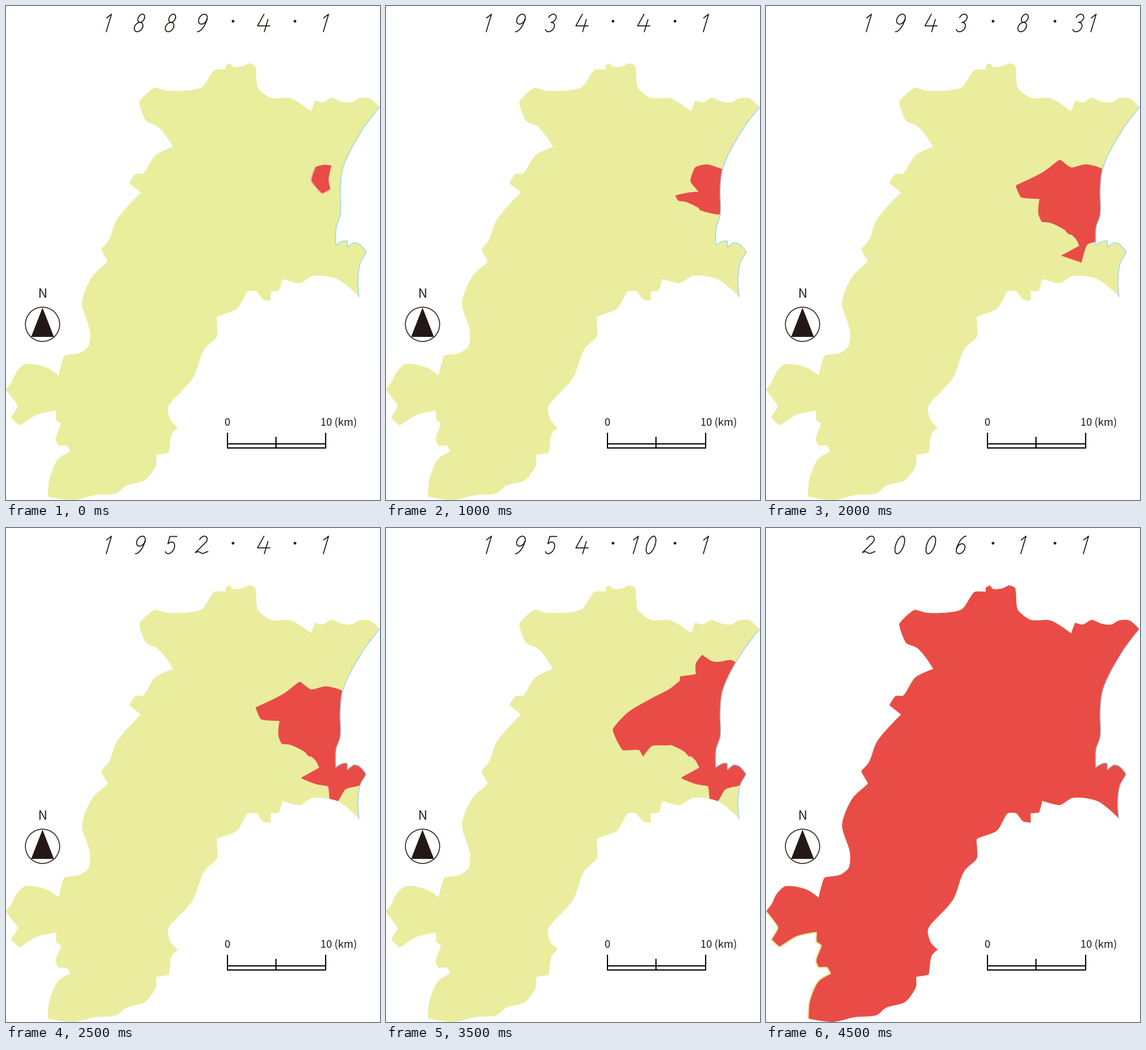
Write a matplotlib script that moves like this. It is 640 px wide and 845 px high and loops after 5000 ms.

```python
import numpy as np
import matplotlib.pyplot as plt
from matplotlib.animation import FuncAnimation
from matplotlib.collections import LineCollection
from matplotlib.patches import Circle, Polygon

W, H, DPI = 640, 845, 80
PX = 72 / DPI
INK = "#231815"
RED = "#e94c47"
SEA = "#a3d9e8"
YELLOWS = ["#e8ee9c", "#eaed9e"]

# Key points of the border, clockwise from the north-west corner
NORTH = [(228, 164), (254, 140), (276, 145), (335, 139), (357, 109),
         (376, 109), (376, 102), (383, 98), (388, 104), (405, 103),
         (416, 98), (426, 102), (431, 140), (453, 157), (487, 158),
         (522, 180), (529, 162), (542, 165), (557, 157), (576, 164),
         (591, 165), (604, 158), (622, 158)]
COAST = [(639, 173), (611, 210), (576.5, 277), (572, 313), (572, 357),
         (565, 379), (564.5, 409), (576, 402.5), (584, 402), (584.5, 413),
         (595, 405), (604, 407), (616, 421), (606, 440), (602, 470),
         (604, 497)]
SOUTH = [(567, 467), (524, 462), (503, 474), (473, 467), (467, 487),
         (453, 488), (453, 504), (440, 502), (428, 488), (414, 488),
         (395, 518), (361, 532), (361, 565), (340, 586), (320, 636),
         (277, 687), (282, 709), (294, 721), (284, 731), (278, 764),
         (257, 768), (257, 784), (238, 811), (205, 821), (190, 833),
         (151, 837), (115, 845)]
SOUTHWEST = [(72, 839), (74, 810), (90, 774), (110, 762), (104, 752),
             (90, 752), (85, 741), (94, 714), (86, 708), (86, 692),
             (53, 699), (23, 717), (9, 704), (20, 684), (0, 656)]
WEST = [(9, 644), (18, 626), (32, 613), (49, 613), (73, 620), (90, 632),
        (100, 598), (127, 593), (141, 582), (144, 559), (130, 508),
        (148, 462), (174, 437), (163, 416), (175, 402), (190, 365),
        (231, 319), (211, 303), (222, 287), (234, 287), (256, 255),
        (286, 241), (272, 220), (258, 205), (240, 197)]
AREA = NORTH + COAST + SOUTH + SOUTHWEST + WEST

# Districts overlap each other and the sea; the land border trims them
TOWN = [(529, 276), (545, 271.5), (557, 273), (552, 297), (555, 314),
        (541, 321), (529, 309), (522, 298)]
PORT = [(529, 277), (548, 271), (576, 279), (590, 283), (590, 357),
        (563, 356), (536, 348), (534, 330), (536, 321), (521, 300)]
SPUR = [(495, 324), (533, 318), (560, 330), (545, 350), (513, 335),
        (500, 333)]
BAY = [(580, 340), (590, 391), (556, 391), (530, 388), (519, 391),
       (512, 384), (531, 363), (532, 348)]
HILLS = [(576, 279), (548, 271), (522, 276), (503, 263), (474, 284),
         (427, 307), (436, 327), (468, 330), (466, 355), (472, 369),
         (487, 371), (529, 397), (536, 410), (505, 427), (540, 439),
         (550, 408), (572, 400), (590, 340)]
DELTA = [(536, 410), (505, 428), (530, 438), (551, 442), (554, 470),
         (567, 468), (581, 447), (606, 440), (640, 420), (600, 395),
         (560, 385)]
TOWER = [(503, 254), (530, 250), (530, 232), (541, 217), (558, 229),
         (549, 243), (549, 269), (576, 279), (560, 300), (500, 300),
         (503, 263)]
BEACH = [(541, 217), (553, 226), (566, 229), (591, 226), (612, 240),
         (600, 290), (540, 300)]
UPLAND = [(503, 261), (487, 274), (455, 291), (412, 317), (388, 345),
          (405, 380), (433, 380), (440, 391), (455, 373), (487, 371),
          (520, 300)]
VALLEY = [(453, 159), (487, 160), (522, 182), (526, 176), (539, 195),
          (531, 207), (541, 218), (553, 228), (530, 280), (500, 275),
          (503, 261), (499, 242), (470, 210), (449, 193), (448, 177)]

STAGES = [("1889.4.1", [TOWN]), ("1909.4.1", [PORT]), ("1934.4.1", [SPUR]),
          ("1936.3.1", [BAY]), ("1943.8.31", [HILLS]), ("1952.4.1", [DELTA]),
          ("1954.1.15", [TOWER]), ("1954.10.1", [BEACH, UPLAND]),
          ("1973.2.1", [VALLEY]), ("2006.1.1", [AREA])]
LAST = len(STAGES) - 1


def smooth(points, closed=True, n=8):
    """Curve through the points that bends at gentle turns, not at corners."""
    p = np.array(points, float)
    q = np.roll(p, -1, 0)
    size = np.hypot(*(q - p).T)[:, None]
    ahead = (q - p) / size
    behind = np.roll(ahead, 1, 0)
    gentle = np.clip((ahead * behind).sum(1, keepdims=True), 0, 1)
    flow = gentle * (ahead + behind) / 2
    m, k = flow * size, np.roll(flow, -1, 0) * size
    t = np.linspace(0, 1, n, endpoint=False)[:, None, None]
    ease = t * t * (3 - 2 * t)
    curve = p + ease * (q - p) + t * (1 - t) * ((1 - t) * m - t * k)
    curve = curve.swapaxes(0, 1).reshape(-1, 2)
    return curve if closed else np.vstack([curve[:-n], p[-1:]])


def arc(cx, cy, rx, ry, start=0, end=360):
    a = np.radians(np.linspace(start, end, 40))
    return np.column_stack([cx + rx * np.cos(a), cy + ry * np.sin(a)])


def path(*parts):
    return np.vstack(parts).astype(float)


# Upright pen strokes of the numerals, 30 high around their middle
s = np.linspace(0, 1, 20)
wave = np.column_stack([-7 + 21 * s, 13 - 1.5 * np.sin(2.5 * np.pi * s)])
six = path(arc(3, 5, 10, 20, 270, 180), arc(0, 6.5, 7, 8.5, 190, -180))
NUMERALS = {
    "0": [arc(0, 0, 7, 15)],
    "1": [path((0, 15), (0, -15), (-6.5, -8.5))],
    "2": [path(arc(0, -8, 6.5, 7, 190, 390), wave)],
    "3": [path(arc(0, -8, 6.5, 7, 190, 450), arc(0.5, 7, 7.5, 8, -90, 150))],
    "4": [path((-3.5, -15), (-8.5, 5), (12.5, 5)), path((6, -6), (6, 15))],
    "5": [path((6, -14.5), (-6, -14.5), (-5.5, -2),
               arc(0, 5, 7.5, 10, 225, 500))],
    "6": [six],
    "7": [path((-10, -9), (-10, -14), (5, -14), (0, 15))],
    "8": [arc(0, -8, 5.5, 7), arc(0, 7, 7, 8)],
    "9": [-six],
}
SLANT = np.array([[1, 0], [-0.3, 1]])


def number(text, center, pitch):
    """Slanted strokes of a number spread evenly about a centre."""
    left = center - pitch * (len(text) - 1) / 2
    return [stroke @ SLANT + (left + i * pitch, 29)
            for i, d in enumerate(text) for stroke in NUMERALS[d]]


fig = plt.figure(figsize=(W / DPI, H / DPI), dpi=DPI, facecolor="white")
ax = fig.add_axes([0, 0, 1, 1])
ax.set_xlim(0, W)
ax.set_ylim(H, 0)
ax.axis("off")


def fill(points, color):
    return ax.add_patch(Polygon(points, fc=color, lw=0))


def line(points, color=INK, width=2.0):
    return ax.plot(*np.transpose(points), color=color, lw=width * PX)[0]


def label(x, y, text, size, align="center"):
    ax.text(x, y, text, fontsize=size * PX, family="Noto Sans CJK JP",
            color=INK, ha=align, va="baseline")


land = fill(smooth(AREA), YELLOWS[0])
districts = []
for stage, (_, shapes) in enumerate(STAGES):
    for shape in shapes:
        patch = fill(smooth(shape), RED)
        patch.set_clip_path(land)
        districts.append((stage, patch))

line(smooth(COAST, closed=False), SEA, 1.6)
rim = line(smooth(TOWN[4:] + TOWN[:1], closed=False), "#f3b7b5", 1.6)
fringe = line(smooth(SOUTHWEST, closed=False), YELLOWS[1], 2.4)

date = ax.add_collection(LineCollection([], colors=INK, linewidths=1.7 * PX,
                                        capstyle="round", joinstyle="round"))
for x in (388.5, 494.5):
    ax.add_patch(Circle((x, 26), 2.3, fc=INK, lw=0))

# Compass
label(62.5, 499, "N", 22)
ax.add_patch(Circle((62.5, 544.5), 29.3, fill=False, ec=INK, lw=1.5 * PX))
fill([(62.5, 516), (82, 566), (43, 566)], INK)

# Scale bar
label(378.5, 718, "0", 18)
label(538, 718, "10 (km)", 18, "left")
for y in (749, 756):
    line([(379, y), (547, y)], "black")
for x, top in ((379, 731), (462, 738), (547, 731)):
    line([(x, top), (x, 756)], "black")


def update(i):
    year, month, day = STAGES[i][0].split(".")
    land.set_facecolor(YELLOWS[i >= 2])
    for stage, patch in districts:
        patch.set_visible(stage <= i)
    rim.set_visible(i == 0)
    fringe.set_visible(i == LAST)
    date.set_segments(number(year, 255.5, 53) + number(month, 440.5, 26)
                      + number(day, 547.5, 26))


anim = FuncAnimation(fig, update, frames=len(STAGES), interval=500,
                     init_func=lambda: update(0), repeat=True, repeat_delay=0)
plt.show()
```
